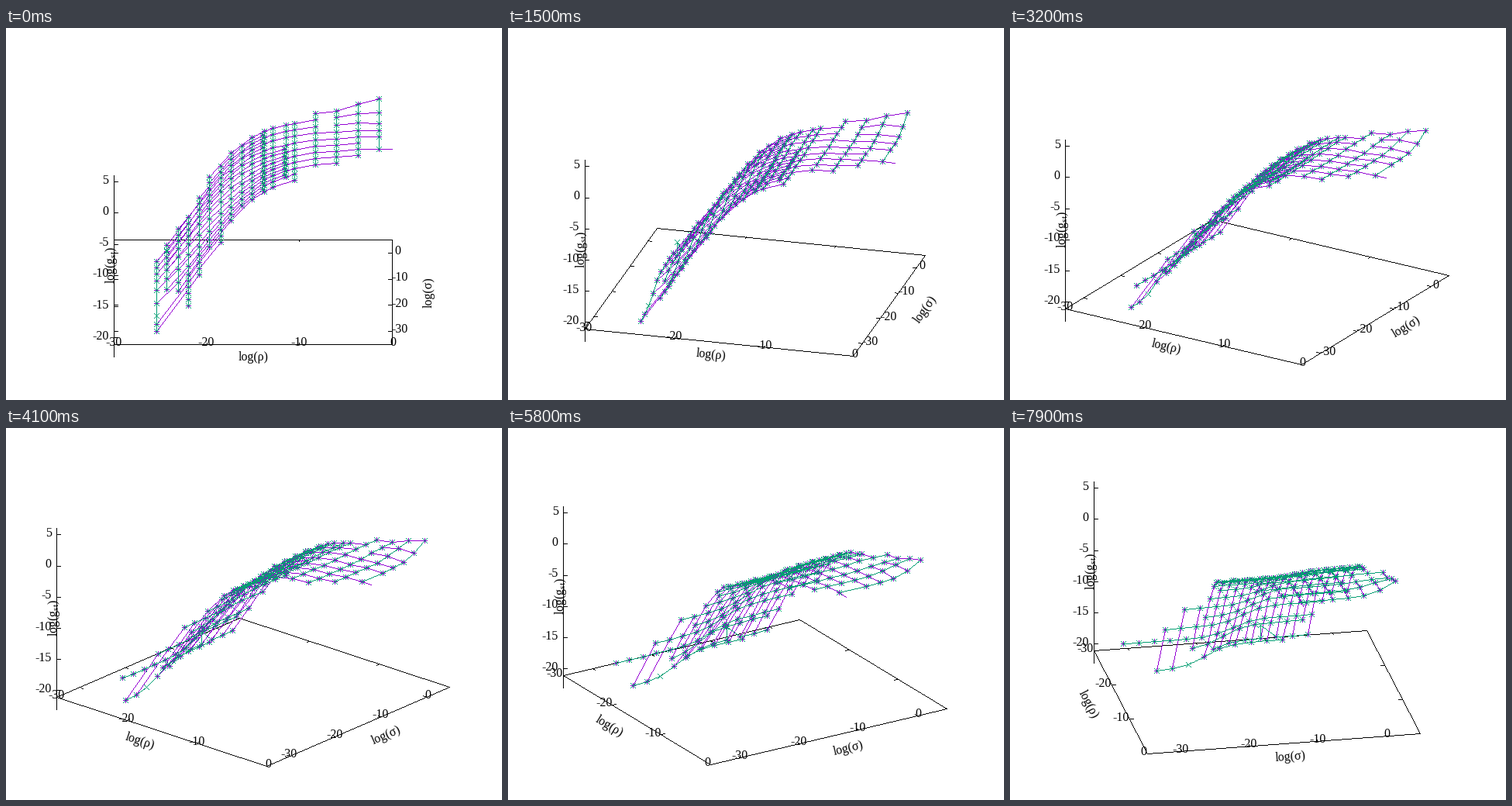
A matplotlib script that plays this animation: 640x480 px, repeating every 8 s.

```python
import numpy as np
import matplotlib.pyplot as plt
from matplotlib.animation import FuncAnimation

plt.rcParams.update({
    "font.family": ["Liberation Serif", "DejaVu Serif"],
    "mathtext.fontset": "custom",
    "mathtext.rm": "Liberation Serif",
})

W, H = 640, 480
FONT = 16 * 0.72                # 16 px at 100 dpi
CX, CY = 318.5, 340.5           # centre of the base plane
SX, SY, SZ = 359, 135, 8.04     # base width, base depth, pixels per z unit
FLOOR = -21.1                   # z of the base plane
BLACK, PURPLE, GREEN = (0, 0, 0), (148, 0, 211), (0, 158, 115)
DECADE = np.log(10) / 40        # one decade of sigma as a share of the axis
START = {"a": -0.300, "b": -0.4452}

# column x at zero rotation, sigma grid, first and last step
COLUMNS = [
    (194.2, "a", 0, 8), (207.2, "b", 6, 12), (221.7, "a", 2, 9),
    (234.7, "b", 0, 12), (249.2, "a", 0, 10), (262.1, "b", 5, 14),
    (276.7, "a", 1, 11), (289.8, "b", 5, 14), (304.2, "a", 3, 11),
    (317.3, "b", 5, 14), (331.0, "a", 3, 11), (333.2, "b", 5, 14),
    (344.4, "b", 5, 14), (358.7, "a", 4, 8), (360.6, "b", 6, 14),
    (371.6, "b", 5, 14), (399.0, "b", 7, 15), (426.4, "b", 7, 15),
    (453.9, "b", 8, 15), (481.4, "b", 9, 15),
]
RHO = [-25.4, -24.3, -23.1, -22, -20.8, -18.5, -17.4, -16.2,
       -15.1, -13.8, -12.8, -10.6, -8.3, -6, -3.7, -1.4]
BASE = [-1.3, 0.8, 3.1, 5.4, 7.9, 12.2, 14.2, 16.1,
        17.5, 18.8, 19.5, 20.6, 21.2, 21.4, 21.7, 21.75]
RISE = [3.5, 2.6, 3.4, 2.5, 2.7, 2.5, 2.1, 1.8,
        1.3, 0.9, 0.75, 0.45, 0.4, 0.65, 1.7, 3.6]


def height(rho, v):
    mid = -0.124 + 0.0218 * (rho + 25.4)
    step = 0.5 * (1 + np.tanh(0.75 * (v - mid) / DECADE))
    return np.interp(rho, RHO, BASE) + np.interp(rho, RHO, RISE) * step


def project(p, a):
    u, v, z = np.asarray(p, float).T
    c, s = np.cos(a), np.sin(a)
    return np.stack([CX + SX * (u * c + v * s),
                     CY + SY * (u * s - v * c) - SZ * z], 1)


GAP = (np.nan, np.nan, np.nan)
rows, chains = {}, []
plus_pts, cross_pts = [], []
for x, grid, k0, k1 in COLUMNS:
    for k in range(k0, k1 + 1):
        if x > 480 and k == 10:
            continue
        v = START[grid] + DECADE * k
        p = ((x - CX) / SX, v, height((x - 498.5) / 11.97, v))
        chains.append(p)
        cross_pts.append(p)
        if (x, k) != (194.2, 2):
            plus_pts.append(p)
            rows.setdefault((grid, k), []).append(p)
        if (x, k) == (207.2, 9):
            spike = (p[0], v, p[2] + 2.1)
            chains.append(spike)
            cross_pts.append(spike)
        if x == 399 and k in (13, 14):
            rows[grid, k].append(GAP)
    chains.append(GAP)
last = rows["b", 9][-1]
rows["b", 9].append((0.5, last[1], last[2]))
row_pts = [p for row in rows.values() for p in row + [GAP]]


def base_lines():
    lo, hi, t = -0.5, 0.5, 0.014
    pts = [(lo, lo, 0), (hi, lo, 0), (hi, hi, 0), (lo, hi, 0), (lo, lo, 0), GAP]
    for e in (lo, hi):
        inner = e - np.sign(e) * t
        for u in (-1 / 6, 1 / 6):
            pts += [(u, e, 0), (u, inner, 0), GAP]
        for v in (-0.375, -0.125, 0.125, 0.375):
            pts += [(e, v, 0), (inner, v, 0), GAP]
    return pts


BOX = base_lines()
canvas = np.empty((H, W, 3), np.uint8)


def draw(pts, color):
    """Hard one-pixel polyline; NaN points break it."""
    for p, q in zip(pts[:-1], pts[1:]):
        if np.isnan(p[0] + q[0]):
            continue
        p, q = np.rint(p), np.rint(q)
        n = int(np.abs(q - p).max()) + 1
        x = np.rint(np.linspace(p[0], q[0], n)).astype(int)
        y = np.rint(np.linspace(p[1], q[1], n)).astype(int)
        canvas[y, x] = color


ARM = np.arange(-3, 4)


def stamp(pts, slopes, color):
    """Marker made of two seven-pixel strokes at every point."""
    x, y = np.rint(pts).astype(int).T[..., None]
    for dx, dy in slopes:
        canvas[y + dy * ARM, x + dx * ARM] = color


fig = plt.figure(figsize=(W / 100, H / 100), dpi=100, facecolor="white")
ax = fig.add_axes([0, 0, 1, 1])
ax.axis("off")
image = ax.imshow(canvas, interpolation="nearest", aspect="auto")


def label(s, ha="center"):
    return ax.text(0, 0, s, fontsize=FONT, ha=ha, va="center", color="black")


xticks = [(n, label(str(n))) for n in (-30, -20, -10, 0)]
yticks = [(n, label(str(n))) for n in (-30, -20, -10, 0)]
zticks = [(n, label(str(n), "right")) for n in range(-20, 6, 5)]
xlabel, ylabel = label("log(ρ)"), label("log(σ)")
zlabel = label(r"log(g$_{\mathrm{st}}$)")
zlabel.set_rotation(90)


def point(u, v, a):
    return project([(u, v, 0)], a)[0]


def place(text, n, pos, ha):
    # non-negative numbers carry a leading blank
    pad = {"left": 4, "center": 2, "right": 0}[ha] if n >= 0 else 0
    text.set_ha(ha)
    text.set_position((pos[0] + pad - 0.7, pos[1] - 2.2))


def update(i):
    a = np.radians(i)
    c, s = np.cos(a), np.sin(a)
    x0, y0 = point(-0.5, -0.5, a)

    canvas[:] = 255
    draw(project(BOX, a), BLACK)
    draw(np.array([(x0, y0 + 16), (x0, y0 - 218)]), BLACK)
    for n, text in zticks:
        y = y0 - SZ * (n - FLOOR)
        draw(np.array([(x0, y), (x0 + 5, y)]), BLACK)
        text.set_position((x0 - 7, y - 1.8))
    draw(project(row_pts, a), PURPLE)
    stamp(project(plus_pts, a), [(1, 0), (0, 1)], PURPLE)
    draw(project(chains, a), GREEN)
    stamp(project(cross_pts, a), [(1, 1), (1, -1)], GREEN)
    image.set_data(canvas)

    for n, text in xticks:
        place(text, n, point(n / 30 + 0.5, -0.5, a),
              "right" if i >= 53 else "center")
    for n, text in yticks:
        place(text, n, point(0.5, (n + 15) / 40, a),
              "left" if i <= 37 else "center")

    xlabel.set_position(point(0, -0.62, a))
    xlabel.set_rotation(-np.degrees(np.arctan2(SY * s, SX * c)))
    ylabel.set_position(point(0.632, 0, a))
    ylabel.set_rotation(np.degrees(np.arctan2(SY * c, SX * s)))
    zlabel.set_position((x0 - 4, y0 - 103))
    return []


anim = FuncAnimation(fig, update, frames=80, interval=100, repeat=True,
                     repeat_delay=0, init_func=lambda: update(0))
plt.show()
```
